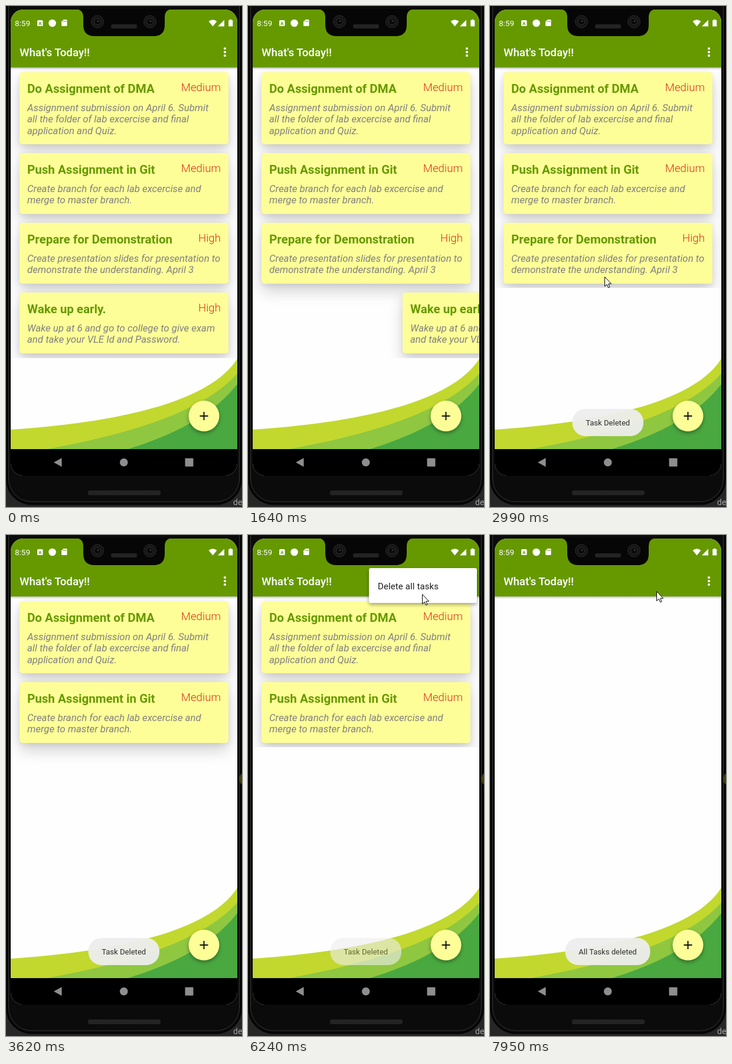
An HTML page that plays this animation: 400x848 px, repeating every 8 s.

```html
<!DOCTYPE html>
<html lang="en">
<head>
<meta charset="utf-8">
<title>Task list</title>
<style>
  html, body { margin: 0; width: 100%; height: 100%; overflow: hidden; background: #000; }
  svg { display: block; width: 400px; height: 848px; font-family: Roboto, "Noto Sans", sans-serif; }
  .title { font-weight: 700; font-size: 20.55px; fill: #690; }
  .level { font-weight: 300; font-size: 18.7px; fill: #d8301c; text-anchor: end; }
  .note { font-style: italic; font-size: 16.8px; fill: #808080; }
  .toast { font-size: 13.08px; fill: #2e2e2e; text-anchor: middle; }
</style>
</head>
<body>
<svg viewBox="0 0 400 848">
  <defs>
    <clipPath id="screenClip"><rect x="8" y="6" width="384" height="789" rx="21"/></clipPath>
    <clipPath id="listClip"><rect id="listArea" x="8" y="104" width="384" height="492"/></clipPath>
    <clipPath id="itemClip"><rect x="205" y="63" width="183" height="45"/></clipPath>
    <filter id="wide" x="-20%" y="-60%" width="140%" height="220%"><feGaussianBlur stdDeviation="13"/></filter>
    <filter id="near" x="-20%" y="-60%" width="140%" height="220%"><feGaussianBlur stdDeviation="5"/></filter>
    <filter id="soft" x="-30%" y="-30%" width="160%" height="160%"><feGaussianBlur stdDeviation="3"/></filter>
    <linearGradient id="barShade" x1="0" y1="0" x2="0" y2="1">
      <stop offset="0" stop-opacity=".25"/><stop offset="1" stop-opacity="0"/>
    </linearGradient>
    <pattern id="mesh" width="3" height="3" patternUnits="userSpaceOnUse">
      <rect width="3" height="3" fill="#191919"/><path d="M0 3L3 0" stroke="#383838"/>
    </pattern>
  </defs>

  <!-- phone body -->
  <rect width="400" height="848" fill="#262626"/>
  <text x="385" y="845" font-size="14" fill="#a5a5a5">de</text>
  <rect x="1.5" y="-60" width="397" height="903" rx="42" fill="#0b0b0b" stroke="#050505" stroke-width="3"/>
  <rect x="4.5" y="-60" width="391" height="899" rx="39" fill="none" stroke="#343434"/>
  <rect x="139" y="820" width="123" height="8" rx="3" fill="url(#mesh)"/>

  <g clip-path="url(#screenClip)">
    <rect x="8" y="6" width="384" height="789" fill="#fefefe"/>
    <path d="M8 717C150 708 340 680 392 597V750H8Z" fill="#c2d82e"/>
    <path d="M70 750C190 728 330 692 392 622V750Z" fill="#8fc740"/>
    <path d="M207 750C270 730 345 700 392 640V750Z" fill="#4aa840"/>

    <g clip-path="url(#listClip)"><g id="shades"></g><g id="cards"></g></g>

    <rect x="8" y="104" width="384" height="4" fill="url(#barShade)"/>
    <rect x="8" y="6" width="384" height="98" fill="#690"/>
    <circle id="dotsRipple" cx="371" cy="78" fill="#fff"/>
    <g fill="#fff">
      <text x="23" y="85" font-size="18.7" font-weight="500">What's Today!!</text>
      <text x="15" y="34" font-size="13.5">8:59</text>
      <rect x="53" y="24" width="9.5" height="10" rx="1.5"/>
      <circle cx="78.5" cy="29" r="6.3"/>
      <path d="M97.500 23H102.500Q103.500 23 103.500 24V33Q103.500 34 102.500 34H95Q94 34 94 33V26.500Z"/>
      <path d="M350.500 34.500L343.500 26Q350.500 20.500 357.500 26Z"/>
      <path d="M359 34.500H370V23.500Z"/>
      <path d="M379 24V22.800H382.300V24H384.300V34.500H377.200V24Z"/>
      <circle cx="371" cy="72" r="2.1"/><circle cx="371" cy="78" r="2.1"/><circle cx="371" cy="84" r="2.1"/>
    </g>
    <text x="57.800" y="32" font-size="8" font-weight="700" fill="#690" text-anchor="middle">A</text>
    <g stroke="#690" stroke-width="1"><path d="M97 25V27M99.300 25V27M101.500 25V27"/></g>

    <circle cx="335.500" cy="697" r="26" opacity=".35" filter="url(#soft)"/>
    <circle cx="335.500" cy="694" r="26" fill="#fefe98"/>
    <path d="M328.500 694H342.500M335.500 687V701" stroke="#111" stroke-width="2"/>

    <g id="taskToast">
      <rect x="139.500" y="682" width="120.500" height="46" rx="22" fill="#eee" fill-opacity=".95"/>
      <text class="toast" x="199.700" y="710">Task Deleted</text>
    </g>
    <g id="allToast">
      <rect x="127.500" y="682" width="144" height="46" rx="22" fill="#eee" fill-opacity=".95"/>
      <text class="toast" x="199.500" y="710">All Tasks deleted</text>
    </g>

    <g id="menu">
      <rect x="205" y="59" width="183" height="59" rx="3" opacity=".35" filter="url(#soft)"/>
      <rect x="205" y="56" width="183" height="59" rx="3" fill="#fff"/>
      <circle id="itemRipple" cx="296.500" cy="86" fill="#e1e1e1" clip-path="url(#itemClip)"/>
      <text x="220" y="91.500" font-size="14.950" letter-spacing=".14" fill="#1c1c1c">Delete all tasks</text>
    </g>

    <rect x="8" y="750" width="384" height="45"/>
    <g fill="#8e8e8e">
      <path d="M81 772.500L94.500 765V780Z"/><circle cx="199.700" cy="772.500" r="6.800"/>
      <rect x="303.500" y="765.500" width="14" height="14" rx="1"/>
    </g>
  </g>

  <!-- notch -->
  <path d="M118 5Q131 6 131 19V32Q131 51 150 51H250Q269 51 269 32V19Q269 6 282 5Z" fill="#060606"/>
  <rect x="178" y="31" width="44" height="7" rx="3" fill="url(#mesh)"/>
  <g id="lenses"></g>

  <ellipse id="glow" cx="400" cy="413" rx="4.500" ry="9" fill="#a0a010" opacity=".38"/>
  <g id="pointer">
    <circle id="press" r="15" fill="#ff0" fill-opacity=".5"/>
    <path d="M.5 .5V16.500L4.200 13.200L6.600 18.700L9 17.700L6.700 12.200H11.600Z" fill="#fff" stroke="#000"/>
  </g>
</svg>
<script>
const $ = id => document.getElementById(id);
const LOOP = 8000;

const tasks = [
  { y: 112, h: 122, title: "Do Assignment of DMA", level: "Medium",
    note: ["Assignment submission on April 6. Submit", "all the folder of lab excercise and final", "application and Quiz."] },
  { y: 249, h: 103, title: "Push Assignment in Git", level: "Medium",
    note: ["Create branch for each lab excercise and", "merge to master branch."] },
  { y: 367, h: 103, title: "Prepare for Demonstration", level: "High",
    note: ["Create presentation slides for presentation to", "demonstrate the understanding. April 3"] },
  { y: 485, h: 103, title: "Wake up early.", level: "High",
    note: ["Wake up at 6 and go to college to give exam", "and take your VLE Id and Password."] }
];

const box = (task, dy, extra) =>
  `<rect x="23" y="${task.y + dy}" width="354" height="${task.h}" rx="5" ${extra}/>`;

$("shades").innerHTML = tasks.map(task => `<g>
  ${box(task, 13, 'opacity=".17" filter="url(#wide)"')}
  ${box(task, 3, 'opacity=".07" filter="url(#near)"')}</g>`).join("");

$("cards").innerHTML = tasks.map(task => `<g>
  ${box(task, 0, 'fill="#fefe98"')}
  <text class="title" x="36" y="${task.y + 34.5}">${task.title}</text>
  <text class="level" x="364" y="${task.y + 32}">${task.level}</text>
  ${task.note.map((line, i) => `<text class="note" x="36" y="${task.y + 65.5 + i * 19.5}">${line}</text>`).join("")}
  </g>`).join("");

$("lenses").innerHTML = [155, 244].map(x => `
  <circle cx="${x}" cy="26.500" r="10.500" fill="#151515" stroke="#2b2b2b"/>
  <circle cx="${x}" cy="26.500" r="5.500" fill="#090909" stroke="#333"/>
  <circle cx="${x + 1}" cy="25.500" r="1.500" fill="#3a3a3a"/>`).join("");

// Runs of screen updates: first, last, count
const runs = [
  [380, 920, 8], [1070, 1070, 1], [1240, 1240, 1], [1410, 1710, 5], [1880, 2680, 11],
  [2760, 3540, 11], [3620, 3780, 3], [4080, 4770, 10], [5090, 5090, 1],
  [5320, 5790, 7], [6020, 6550, 8], [7180, 7180, 1], [7330, 7950, 9]
];
const ticks = [0];
for (const [first, last, count] of runs)
  for (let i = 0; i < count; i++)
    ticks.push(Math.floor((first + (last - first) * i / Math.max(1, count - 1)) / 10) * 10);

// Linear keys: [time, value, ...]
function track(t, keys) {
  if (t <= keys[0][0]) return keys[0].slice(1);
  for (let i = 1; i < keys.length; i++) {
    const a = keys[i - 1], b = keys[i];
    if (t <= b[0]) {
      const k = (t - a[0]) / (b[0] - a[0]);
      return a.slice(1).map((v, j) => v + (b[j + 1] - v) * k);
    }
  }
  return keys[keys.length - 1].slice(1);
}

const pointerKeys = [
  [380, 180, 673], [920, 152, 570], [1070, 150, 568], [1240, 150, 568],
  [1410, 215, 564], [1480, 300, 560], [1560, 388, 562], [1630, 430, 562],
  [1960, 430, 590], [2040, 380, 572], [2280, 305, 530], [2600, 224, 488],
  [2680, 206, 480], [2760, 200, 468], [2910, 194, 458], [3070, 194, 458],
  [3150, 215, 450], [3220, 290, 432], [3300, 360, 418], [3380, 407, 413],
  [3460, 430, 400], [4230, 430, 390], [4310, 386, 330], [4390, 372, 206],
  [4460, 374, 130], [4620, 376, 83], [5790, 376, 83], [6020, 366, 86],
  [6170, 318, 98], [6240, 295, 100], [6390, 285, 96], [6550, 282, 95]
];
const presses = [[1240, 1640], [3070, 3460], [5090, 5320], [7180, 7330]];
const swipes = {
  3: [[1240, 0], [1410, 25], [1630, 239], [1710, 325], [1880, 420]],
  2: [[3150, 0], [3220, 20], [3300, 70], [3460, 240], [3620, 410]]
};
const taskToastKeys = [[1950, 0], [2200, 1], [4000, 1], [4240, 0], [4310, 0], [4540, 1], [6080, 1], [6240, .65], [6400, 0]];
const allToastKeys = [[7640, 0], [7870, 1]];
const menuKeys = [[5390, 0, .9], [5710, 1, 1], [7410, 1, 1], [7640, 0, 1]];
const dotsKeys = [[5310, 14, .16], [5470, 29, .16], [5710, 29, 0]];
const itemKeys = [[7320, 66], [7330, 69], [7480, 105]];
const removedAt = [7640, 7640, 3700, 1880];

const show = (node, on) => node.setAttribute("visibility", on ? "visible" : "hidden");
const fade = (id, v) => $(id).setAttribute("opacity", v);

function draw(now) {
  let t = 0;
  for (const tick of ticks) if (tick <= now) t = tick;

  tasks.forEach((task, i) => {
    const dx = swipes[i] ? track(t, swipes[i])[0] : 0;
    for (const id of ["shades", "cards"]) {
      const node = $(id).children[i];
      node.setAttribute("transform", `translate(${dx} 0)`);
      show(node, t < removedAt[i]);
    }
  });
  const bottom = t < 1880 ? 596 : t < 3700 ? 477 : t < 7640 ? 359 : 104;
  $("listArea").setAttribute("height", bottom - 104);

  fade("taskToast", track(t, taskToastKeys)[0]);
  fade("allToast", track(t, allToastKeys)[0]);

  const [alpha, scale] = track(t, menuKeys);
  fade("menu", alpha);
  $("menu").setAttribute("transform", `translate(388 56) scale(${scale}) translate(-388 -56)`);

  const [dotsR, dotsA] = track(t, dotsKeys);
  $("dotsRipple").setAttribute("r", dotsR);
  fade("dotsRipple", t < 5320 ? 0 : dotsA);
  $("itemRipple").setAttribute("r", t < 7330 ? 0 : track(t, itemKeys)[0]);

  const [x, y] = track(t, pointerKeys);
  $("pointer").setAttribute("transform", `translate(${x} ${y})`);
  $("pointer").setAttribute("display", t < 380 ? "none" : "inline");
  show($("press"), presses.some(([from, to]) => t >= from && t < to));
  show($("glow"), t >= 3460);
}

function loop() {
  draw(performance.now() % LOOP);
  requestAnimationFrame(loop);
}
loop();
</script>
</body>
</html>
```
